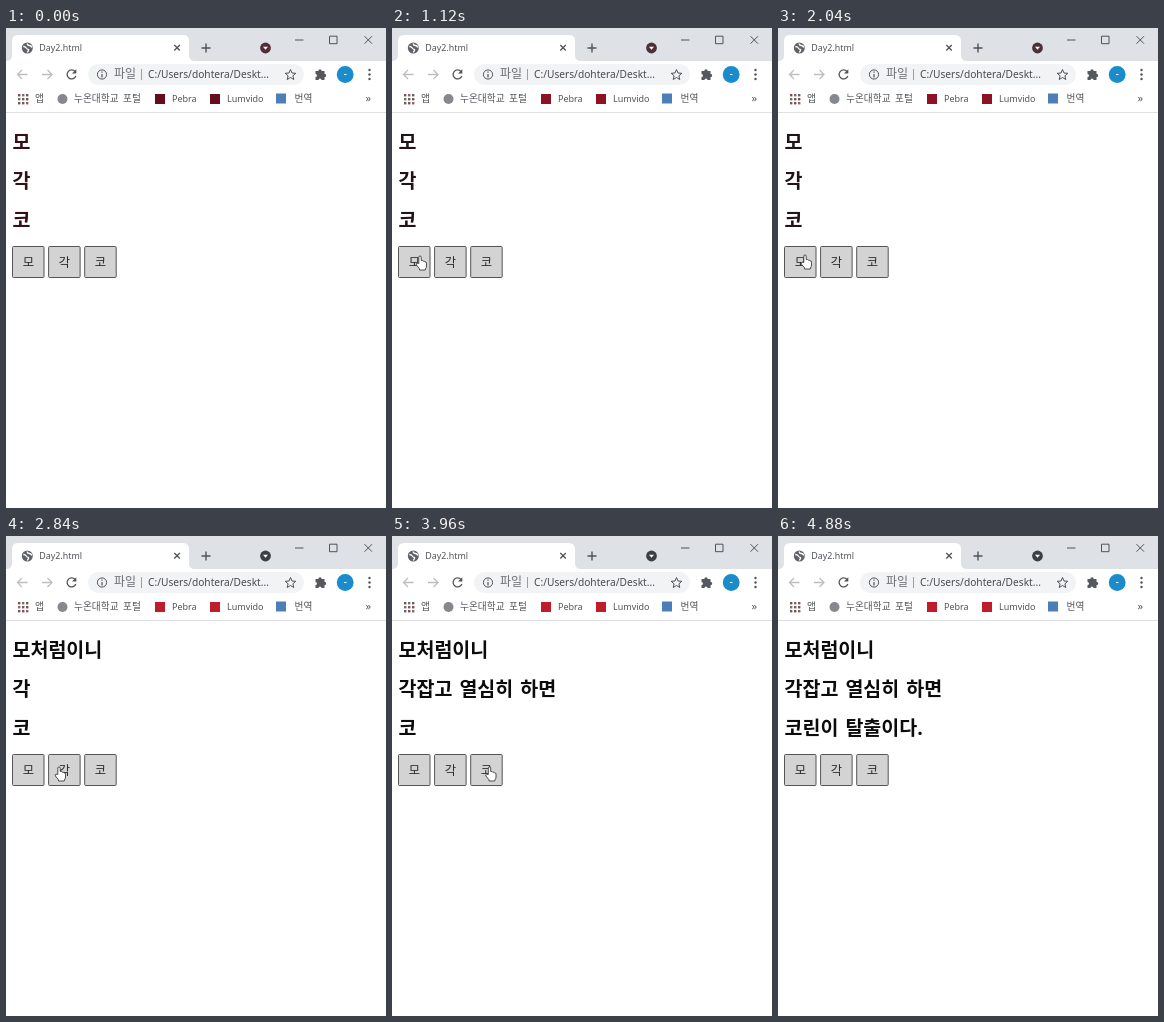
Write an HTML page that moves like this. It is 380 px wide and 480 px high and loops after 5 s.

```html
<!DOCTYPE html>
<html lang="ko">
<head>
<meta charset="utf-8">
<style>
  html, body { margin: 0; width: 100%; height: 100%; overflow: hidden; background: #fff; }
  svg { display: block; }
  text { font-family: "Noto Sans", "Noto Sans CJK KR", "Noto Sans CJK", sans-serif; }
  .line { fill: none; stroke: #505357; }
  .mark { font-size: 9px; fill: #505357; }
  .mark .ko { font-size: 9.7px; word-spacing: 2px; }
  .head { font-size: 19.5px; font-weight: 700; word-spacing: 2px; }
  .btn rect { fill: #d3d3d3; stroke: #555; }
  .btn text { font-size: 12.3px; text-anchor: middle; fill: #2a2a2a; }
  .cursor path { fill: #fff; stroke: #3c3c3c; stroke-width: .9; stroke-linejoin: round; }
</style>
</head>
<body>
<svg width="380" height="480" viewBox="0 0 380 480">
  <!-- tab strip -->
  <rect width="380" height="33" fill="#dee1e6"/>
  <path d="M0 33Q6 33 6 27V13Q6 7 12 7H177Q183 7 183 13V27Q183 33 189 33Z" fill="#fff"/>
  <circle cx="21.300" cy="20" r="5.500" fill="#5f6368"/>
  <path d="M17.300 18.500q2 0 3 1.500t2 1.500-1 3M21.300 15.500q0 2 2 2t2.500 2" fill="none" stroke="#fff" stroke-width="1.300"/>
  <text x="33.300" y="23.300" font-size="8.900" fill="#505357">Day2.html</text>
  <path class="line" d="M168.300 17l5.500 5.500m0-5.500l-5.500 5.500" stroke-width="1.300"/>
  <path class="line" d="M195.500 20h9m-4.500-4.500v9" stroke-width="1.400"/>
  <circle id="badge" cx="259.500" cy="20" r="5.400"/>
  <path d="M257 18.800h5l-2.500 3z" fill="#fff"/>
  <path class="line" d="M289 12h8.500M323.500 8.200h7.500v7.500h-7.500zM358.500 8.200l7.500 7.500m0-7.500l-7.500 7.500"/>

  <!-- toolbar -->
  <g fill="none" stroke="#bcbec1" stroke-width="1.300">
    <path d="M21.500 46.500h-10m4.500-4.500l-4.500 4.500 4.500 4.500"/>
    <path d="M36 46.500h10m-4.500-4.500l4.500 4.500-4.500 4.500"/>
  </g>
  <path class="line" d="M69 43.500A4.500 4.500 0 1 0 69.800 48" stroke-width="1.300"/>
  <path d="M70.300 41.300v4.200H66z" fill="#505357"/>
  <rect x="82" y="36" width="216" height="21" rx="10.500" fill="#f1f3f4"/>
  <circle class="line" cx="96" cy="46.500" r="4.600"/>
  <path class="line" d="M96 43.500v1.200m0 1.300v3.500" stroke-width="1.200"/>
  <text x="108" y="50.300" font-size="12" fill="#6b6f74">파일</text>
  <path d="M135.500 41v11" stroke="#9aa0a6"/>
  <text x="142" y="50.300" font-size="10.200" fill="#484b50">C:/Users/dohtera/Deskt...</text>
  <path class="line" d="M284.500 41.500l1.500 3.500 3.800.3-2.900 2.500.9 3.700-3.300-2-3.300 2 .9-3.700-2.900-2.500 3.800-.3z"/>
  <path d="M309.500 43h2.800a1.700 1.700 0 1 1 3.400 0h2.800v2.800a1.700 1.700 0 1 1 0 3.400V52h-3a1.500 1.500 0 0 0-3 0h-3v-3a1.500 1.500 0 0 0 0-3z" fill="#55585c"/>
  <circle cx="339.200" cy="46.500" r="8.400" fill="#1a8bcb"/>
  <path d="M338 46.500h2.500" stroke="#fff"/>
  <g fill="#505357"><circle cx="363.500" cy="42" r="1.200"/><circle cx="363.500" cy="46.500" r="1.200"/><circle cx="363.500" cy="51" r="1.200"/></g>

  <!-- bookmarks -->
  <g id="apps"></g>
  <circle cx="56.500" cy="71" r="5" fill="#85888c"/>
  <rect class="red" x="149" y="66" width="10" height="10"/>
  <rect class="red" x="204" y="66" width="10" height="10"/>
  <rect x="270" y="65.500" width="10" height="10" fill="#4c7fb8"/>
  <g class="mark">
    <text class="ko" x="29" y="74.300">앱</text>
    <text class="ko" x="68" y="74.300">누온대학교 포털</text>
    <text x="166" y="74">Pebra</text>
    <text x="221" y="74">Lumvido</text>
    <text class="ko" x="288.500" y="74.300">번역</text>
    <text x="359.500" y="74" font-size="11">»</text>
  </g>
  <path d="M0 84.500h380" stroke="#dfe1e4"/>

  <!-- page -->
  <g id="heads"></g>
  <g id="buttons"></g>
  <g class="cursor" id="cursor">
    <path id="arrow" d="M0 0V10.200L2.400 8 4 11.700 5.700 11 4.100 7.400H7.200Z"/>
    <path id="hand" d="M-1.200 7.500V1Q-1.200 0 0 0T1.200 1V4.500Q2.800 4 3.200 5.200 4.600 4.700 5 5.900 6.500 5.500 6.500 7.200V10Q6.500 12 5.300 13V14H-.5V12.800L-3.600 9Q-4.200 7.400-3 7.200Z"/>
  </g>
</svg>
<script>
const LOOP = 5000, STEP = 40;
const $ = id => document.getElementById(id);

function add(parent, tag, attrs, text = "") {
  const el = document.createElementNS("http://www.w3.org/2000/svg", tag);
  for (const key in attrs) el.setAttribute(key, attrs[key]);
  el.textContent = text;
  return parent.appendChild(el);
}

// Each line is replaced by its long form once its button is clicked.
const lines = [
  { short: "모", long: "모처럼이니", click: 2320 },
  { short: "각", long: "각잡고 열심히 하면", click: 3200 },
  { short: "코", long: "코린이 탈출이다.", click: 4160 }
];
lines.forEach((line, i) => {
  line.el = add($("heads"), "text", { class: "head", x: 6.5, y: 120.5 + i * 39.3 });
  const btn = add($("buttons"), "g", { class: "btn" });
  const x = 6.5 + i * 36.1;
  add(btn, "rect", { x, y: 218.5, width: 31.5, height: 31, rx: 1 });
  add(btn, "text", { x: x + 15.8, y: 238.6 }, line.short);
});

const dots = ["#8d4a4a", "#77706a", "#5f6368"];
for (let i = 0; i < 9; i++) {
  const col = i % 3, row = (i - col) / 3;
  add($("apps"), "rect", { x: 12 + col * 4, y: 66 + row * 4, width: 2.4, height: 2.4, fill: dots[(col + row) % 3] });
}

// time, heading, red icons, badge
const tints = [
  [0, "#340f18", "#650d1b", "#552c35"],
  [280, "#22121a", "#8c1224", "#4d3037"],
  [2320, "#0c0c0c", "#c01c2c", "#3c4043"]
];

// time, x, y of the pointer tip
const path = [
  [480, 132, 449], [520, 98, 343], [560, 48, 261], [600, 30, 236], [720, 28, 228],
  [1720, 28, 228], [2000, 27, 227], [2440, 27, 227], [2680, 53, 231],
  [3440, 53, 231], [3720, 97.5, 231], [4440, 97.5, 231]
];

function pointer(t) {
  const i = path.findIndex(p => p[0] > t);
  if (i < 1) return null;
  const [t0, x0, y0] = path[i - 1], [t1, x1, y1] = path[i];
  const k = (t - t0) / (t1 - t0);
  return [x0 + (x1 - x0) * k, y0 + (y1 - y0) * k];
}

const overButton = (x, y) =>
  y >= 218 && y <= 250 && [6, 42, 78].some(left => x >= left && x <= left + 33);

function draw(t) {
  const [, ink, red, badge] = tints.filter(row => row[0] <= t).pop();
  for (const line of lines) {
    line.el.textContent = t < line.click ? line.short : line.long;
    line.el.setAttribute("fill", ink);
  }
  document.querySelectorAll(".red").forEach(el => el.setAttribute("fill", red));
  $("badge").setAttribute("fill", badge);

  const pos = pointer(t);
  $("cursor").style.display = pos ? "" : "none";
  if (!pos) return;
  const hand = overButton(...pos);
  $("cursor").setAttribute("transform", `translate(${pos})`);
  $("hand").style.display = hand ? "" : "none";
  $("arrow").style.display = hand ? "none" : "";
}

const start = performance.now();
function tick() {
  const t = (performance.now() - start) % LOOP;
  draw(Math.floor(t / STEP) * STEP);
  requestAnimationFrame(tick);
}
tick();
</script>
</body>
</html>
```
